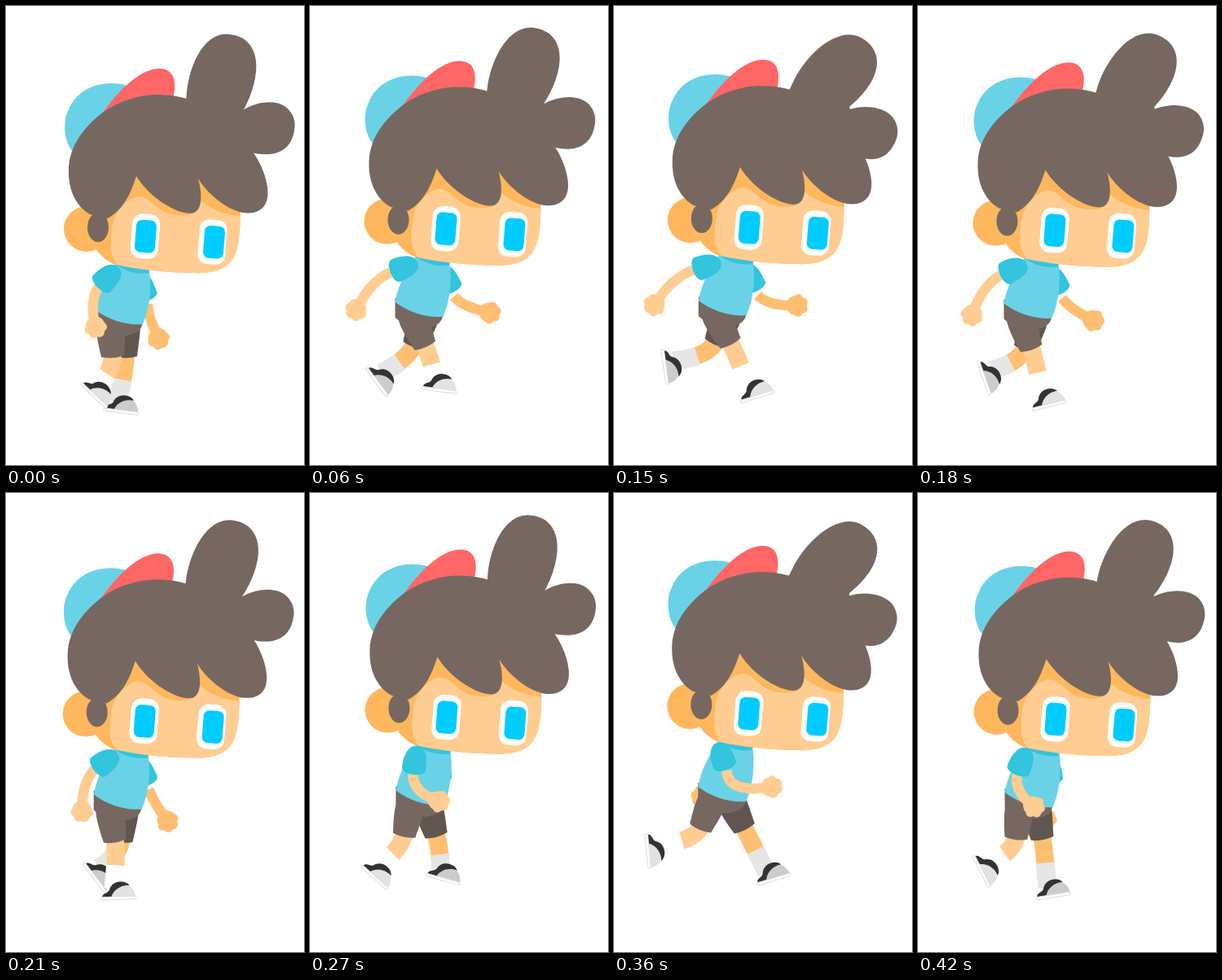
An HTML page with a canvas that plays this animation: 366x564 px, repeating every 450 ms.

```html
<!DOCTYPE html>
<html lang="en">
<head>
<meta charset="utf-8">
<title>Running boy</title>
<style>
  html, body { margin: 0; height: 100%; overflow: hidden; background: #fff; }
  canvas { display: block; }
</style>
</head>
<body>
<canvas id="stage" width="366" height="564"></canvas>
<script>
const ctx = document.getElementById('stage').getContext('2d');
const { sin, cos, atan2, hypot, abs, PI } = Math;
const STEP = 30, STEPS = 15;
const HAIR = '#766860', SHIRT = '#6ad2e7', SLEEVE = '#33c4de', SHADE = '#ffb75e';

// Arms swing through three key poses: sleeve end, elbow, hand.
const NEAR = {
  skin: '#ffcd91', shorts: HAIR, sock: '#fff', toe: '#e2e2e2',
  back: [102, 334, 72, 343, 49, 372],
  mid: [114, 344, 102, 363, 110, 394],
  front: [146, 353, 148, 383, 204, 371]
};
const FAR = {
  skin: '#ffbf72', shorts: '#61564f', sock: '#e6e6e6', toe: '#ccc',
  back: [152, 362, 127, 380, 110, 382],
  mid: [174, 366, 174, 380, 187, 408],
  front: [182, 366, 197, 380, 234, 370]
};

const rad = degrees => degrees * PI / 180;
const mix = (a, b, t) => a + (b - a) * t;

function fill(color, d) {
  ctx.fillStyle = color;
  ctx.fill(new Path2D(d));
}

function oval(color, x, y, rx, ry = rx) {
  ctx.fillStyle = color;
  ctx.beginPath();
  ctx.ellipse(x, y, rx, ry, 0, 0, 7);
  ctx.fill();
}

function box(color, w, h, r) {
  ctx.fillStyle = color;
  ctx.beginPath();
  ctx.roundRect(-w / 2, -h / 2, w, h, r);
  ctx.fill();
}

function bend(color, width, x0, y0, cx, cy, x1, y1) {
  ctx.strokeStyle = color;
  ctx.lineWidth = width;
  ctx.beginPath();
  ctx.moveTo(x0, y0);
  ctx.quadraticCurveTo(cx, cy, x1, y1);
  ctx.stroke();
}

function at(x, y, angle, draw) {
  ctx.save();
  ctx.translate(x, y);
  ctx.rotate(angle);
  draw();
  ctx.restore();
}

// swing runs from -1 (back) to 1 (front)
function arm(look, shoulderX, shoulderY, swing) {
  const { back, mid, front } = look;
  const [sx, sy, ex, ey, hx, hy] = mid.map((m, i) =>
    m + (front[i] - back[i]) / 2 * swing + ((front[i] + back[i]) / 2 - m) * swing ** 2);
  bend(look.skin, 12.5, sx, sy, ex, ey, hx, hy);
  at(hx, hy, atan2(hy - ey, hx - ex), () => {
    oval(look.skin, 0, 0, 13, 12);
    for (let a = -1.3; a < 1.6; a += 0.9) oval(look.skin, 9 * cos(a), 8.5 * sin(a), 5.5);
  });
  at(shoulderX, shoulderY, atan2(sy - shoulderY, sx - shoulderX), () =>
    fill(SLEEVE, 'M-10 0C-10-13 6-14 19-15C27-12 28 9 21 14C8 16-10 12-10 0Z'));
}

function shoe(look) {
  fill(look.toe, 'M-11-2C-9-13 3-20 13-17Q21-11 21-2Z');
  fill('#333', 'M-20-3C-20-9-13-8-11-12C-9-19-3-22 3-22Q10-22 14-17C3-18-6-12-9-3Z');
  ctx.fillStyle = '#fff';
  ctx.strokeStyle = '#ddd';
  ctx.lineWidth = 1;
  ctx.beginPath();
  ctx.roundRect(-21.5, -3.5, 43, 3.5, 1.5);
  ctx.fill();
  ctx.stroke();
}

function leg(look, hipX, phase, dx) {
  const s = sin(phase), c = cos(phase), c2 = cos(2 * phase), hipY = 386;
  const kx = dx + 131 + 20 * s, ky = 427 + 3.5 * c2;
  const fx = dx + 116 + 71 * s - 9 * c, fy = 479 + 16 * s - 10 * c + 11 * c2;
  const turn = rad(30 - 47 * s + 18 * c - 5 * c2);
  const thigh = atan2(ky - hipY, kx - hipX), length = hypot(kx - hipX, ky - hipY);
  const cx = kx + 18 * cos(thigh), cy = ky + 18 * sin(thigh);
  const ax = fx - 6 * cos(turn) + 13 * sin(turn);
  const ay = fy - 6 * sin(turn) - 13 * cos(turn);
  // The sock covers the last part of the shin curve.
  const cut = 0.6, qx = mix(cx, ax, cut), qy = mix(cy, ay, cut);
  const mx = mix(mix(kx, cx, cut), qx, cut), my = mix(mix(ky, cy, cut), qy, cut);
  bend(look.skin, 22, kx - 4 * cos(thigh), ky - 4 * sin(thigh), cx, cy, ax, ay);
  bend(look.sock, 23, mx, my, qx, qy, ax, ay);
  at(fx, fy, turn, () => shoe(look));
  at(hipX, hipY, thigh, () =>
    fill(look.shorts, `M-8-14C5-20 14-18 ${length}-14Q${length + 4} 0 ${length} 14C14 19 4 19-8 14Z`));
}

function eye(x, y, shift) {
  at(x, y, rad(4.5), () => {
    box('#fff', 34, 55, 12);
    ctx.translate(shift, 0);
    box('#0cf', 25, 40, 7);
  });
}

function head(sway) {
  fill(SHIRT, 'M81 178C70 163 70 140 77 127C88 101 117 90 147 97L170 130Z');
  fill('#f66', 'M116 135C140 100 168 75 191 77C207 79 210 94 205 114Z');
  oval(SHADE, 99, 274, 28);
  fill(SHADE, 'M105 200L288 200L288 252C287 285 286 300 277 313C267 325 252 329 228 328C190 327 155 323 132 317C117 309 107 299 105 280Z');
  fill(NEAR.skin, 'M163 234C148 236 131 255 130 276C127 297 130 310 137 318C165 324 200 328 228 328C252 329 267 325 277 313C286 300 287 285 288 258C270 257 254 251 239 239C239 253 228 260 207 257C183 253 180 235 163 234Z');
  eye(171, 283, 0.5);
  eye(253.5, 290, 2);
  at(258, 120, rad(sway), () =>
    fill(HAIR, 'M-36 5C-40-32-24-86 10-86C39-86 48-63 47-42C46-20 38 0 27 20L-35 20Z'));
  at(260, 152, rad(sway * 0.6), () =>
    fill(HAIR, 'M30-25C48-37 70-39 82-31C92-24 96-13 94-2C92 17 80 26 65 28C56 29 48 28 38 26L0 20L0-10Z'));
  fill(HAIR, 'M103 256C85 245 76 225 77 200C78 171 97 147 120 130C150 109 190 103 226 115L294 132L303 179C318 200 325 227 320 240C316 252 304 256 291 254C270 250 246 229 236 212C242 235 240 250 231 254C218 259 180 241 160 209C152 235 142 251 125 261Z');
  oval(HAIR, 113, 272, 13, 18);
}

function draw(step) {
  const phase = 2 * PI * step / STEPS, swing = sin(phase);
  const rise = -12.6 * abs(swing);
  const sway = 15.5 * (1 - cos(2 * phase - 0.63));
  ctx.fillStyle = '#fff';
  ctx.fillRect(0, 0, 366, 564);
  at(rise * 0.48, rise, 0, () => {
    arm(FAR, 166 + 5 * swing, 338, swing);
    leg(FAR, 147, phase + PI, 16);
    fill(HAIR, 'M109 368L168 386C168 396 162 403 148 405Q124 406 109 392Z');
    leg(NEAR, 128, phase, 0);
    fill(SHIRT, 'M135 316C124 332 113 350 109 373C126 386 149 393 168 391C177 370 179 345 176 324Z');
    fill(SLEEVE, 'M134 317L177 322L175 328Q153 331 134 317Z');
    arm(NEAR, 131 - 5 * swing, 328, -swing);
    head(sway);
  });
}

function tick() {
  draw(Math.floor(performance.now() / STEP) % STEPS);
  requestAnimationFrame(tick);
}
tick();
</script>
</body>
</html>
```
